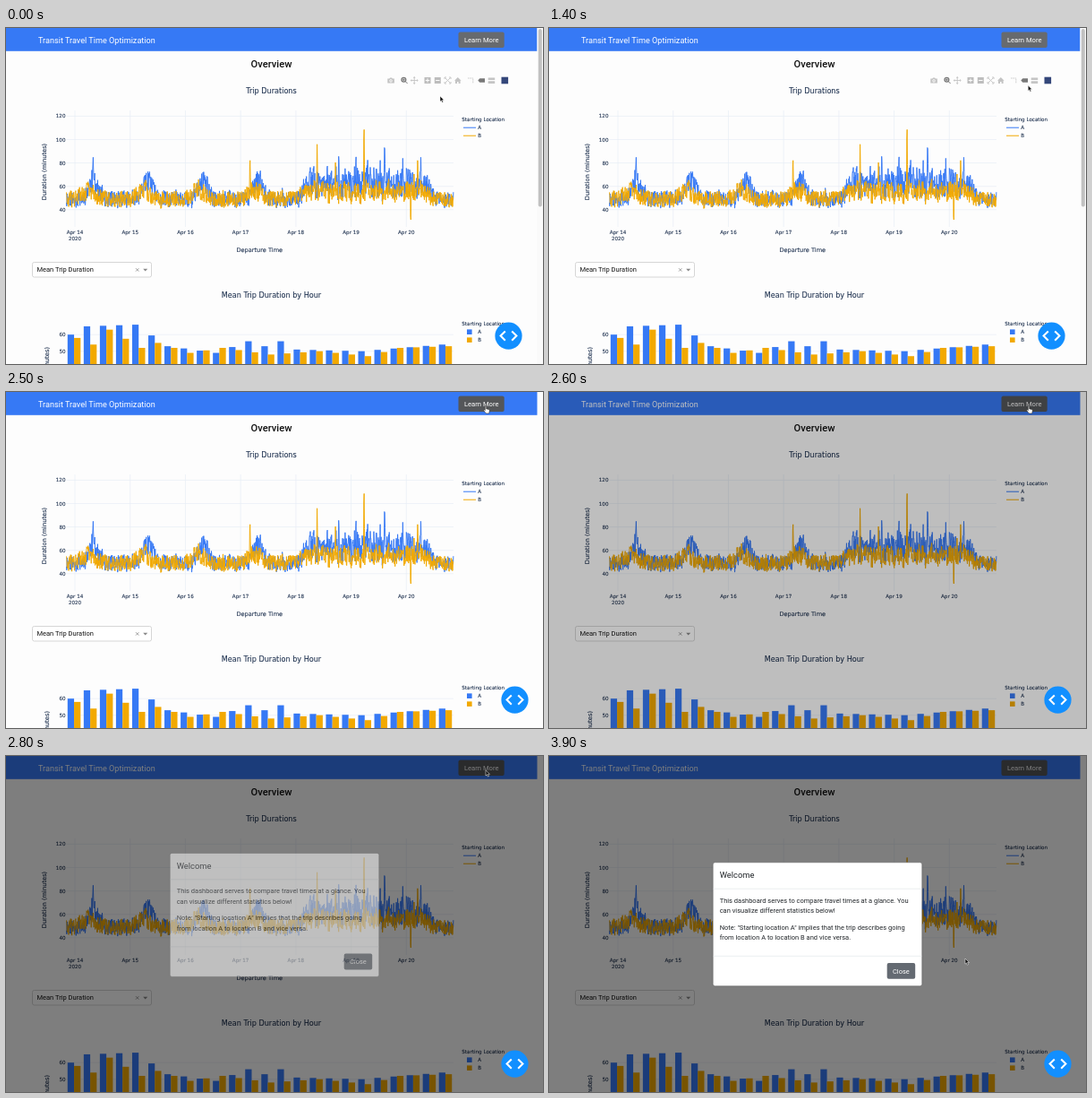
An HTML page that plays this animation: 600x375 px, repeating every 4000 ms.

```html
<!DOCTYPE html>
<html lang="en">
<head>
<meta charset="utf-8">
<title>Dashboard</title>
<style>
html, body { margin: 0; width: 100%; height: 100%; overflow: hidden; background: #fff; }
svg { display: block; width: 600px; height: 375px; }
.ui { font-family: Roboto, sans-serif; font-size: 7.5px; }
.plot { font-family: "DejaVu Sans", sans-serif; font-size: 5.6px; }
.plot text { fill: #1f3250; stroke: #1f3250; stroke-width: .1; }
.mid { text-anchor: middle; }
.end { text-anchor: end; }
</style>
</head>
<body>
<svg viewBox="0 0 600 375" xmlns="http://www.w3.org/2000/svg">
  <rect width="600" height="375" fill="#fdfdfd"/>
  <g class="ui">
    <rect width="593.5" height="25.8" fill="#3679f5"/>
    <text x="36" y="16.5" font-size="9.12" fill="#fff">Transit Travel Time Optimization</text>
    <rect id="learn" x="505.5" y="4.5" width="51.2" height="17.5" rx="2"/>
    <text class="mid" x="531.2" y="16" font-size="7.65" fill="#fff">Learn More</text>
    <text class="mid" x="296.5" y="44.3" font-size="11.2" font-weight="500" fill="#111">Overview</text>
    <rect x="29.5" y="261.5" width="133" height="16.5" rx="2" fill="#fff" stroke="#ccc" stroke-width=".8"/>
    <text x="34.5" y="272.3" fill="#111">Mean Trip Duration</text>
    <path d="M145 268.2l3.4 3.4m0-3.4l-3.4 3.4" stroke="#888" stroke-width=".8"/>
    <path d="M153.2 268.8h5l-2.5 2.6z" fill="#888"/>
  </g>
  <g class="plot">
    <g id="grid" stroke="#e9eef7" stroke-width=".7"></g>
    <g id="ticks"></g>
    <g id="lines" fill="none" stroke-width=".95" stroke-linejoin="round"></g>
    <g id="bars"></g>
    <g class="mid">
      <text x="296.5" y="73.3" font-size="8.1">Trip Durations</text>
      <text x="283.3" y="249.7" font-size="6.6">Departure Time</text>
      <text x="296.5" y="301" font-size="8.1">Mean Trip Duration by Hour</text>
      <text transform="translate(44.5 160.5) rotate(-90)" font-size="6.7">Duration (minutes)</text>
    </g>
    <text class="end" transform="translate(48.3 356) rotate(-90)" font-size="6.7">Mean Duration (minutes)</text>
    <g id="legends"></g>
  </g>
  <g id="modebar" fill="none" stroke="#c4c4c4" stroke-width="1.3">
    <path d="M426.3 56.5h2l.8-1h2l.8 1h2v5h-7.6z" fill="#c4c4c4" stroke="none"/>
    <circle cx="430" cy="58.9" r="1.3" stroke="#fff" stroke-width=".8"/>
    <g stroke="#787878"><circle cx="444.4" cy="57.8" r="2.4"/><path d="M446.2 59.6l2.4 2.4M443 57.8h2.8m-1.4-1.4v2.8" stroke-width="1"/></g>
    <path d="M452.5 58.5h7.4m-3.7-3.7v7.4" stroke-width=".9"/>
    <path d="M456.2 54l1.4 1.7h-2.8zM456.2 63l1.4-1.7h-2.8zM451.7 58.5l1.7-1.4v2.8zM460.7 58.5l-1.7-1.4v2.8z" fill="#c4c4c4" stroke="none"/>
    <path d="M467.5 55h7v7h-7zM478.8 55h7v7h-7z" fill="#bdbdbd" stroke="none"/>
    <path d="M468.8 58.5h4.4m-2.2-2.2v4.4M480.1 58.5h4.4" stroke="#fff" stroke-width="1"/>
    <path d="M490.5 55.5l6 6m0-6l-6 6M490 57v-2h2M495 55h2v2M497 60v2h-2M492 62h-2v-2" stroke-width=".9"/>
    <path d="M501 58.7l3.8-3.7 3.8 3.7h-1v3.3h-2v-2h-1.6v2h-2v-3.3z" fill="#c4c4c4" stroke="none"/>
    <path d="M516 56h5.8v6" stroke-width=".9" stroke-dasharray="1.5 .8"/>
    <path d="M527.3 58.5l2-2.3h5.7v4.6h-5.7z" fill="#787878" stroke="none"/>
    <path d="M538.7 55.4h7.5v2.7h-7.5zM538.7 59.3h7.5v2.7h-7.5z" fill="#c4c4c4" stroke="none"/>
    <rect x="553.5" y="54.7" width="7.6" height="7.6" fill="#34477a" stroke="none"/>
  </g>
  <g id="scroll"><rect x="593.5" width="6.5" height="375" fill="#fafafa"/><rect x="594.8" y="1" width="4" height="198.5" rx="2" fill="#c1c1c1"/></g>
  <rect id="shade" width="600" height="375"/>
  <g id="modal" class="ui" fill="#212529">
    <rect x="183.2" y="118.8" width="233.6" height="138" rx="2.2" fill="#fff" stroke="#555" stroke-width=".5"/>
    <path d="M183.5 148.2h233M183.5 223.3h233" stroke="#dee2e6" stroke-width=".6"/>
    <text x="190.7" y="136.3" font-size="9.36">Welcome</text>
    <text x="190.7" y="163.8">This dashboard serves to compare travel times at a glance. You</text>
    <text x="190.7" y="175">can visualize different statistics below!</text>
    <text x="190.7" y="193.8">Note: "Starting location A" implies that the trip describes going</text>
    <text x="190.7" y="205">from location A to location B and vice versa.</text>
    <rect x="377.7" y="231" width="31.5" height="17.8" rx="2" fill="#646a72"/>
    <text class="mid" x="393.4" y="242.6" fill="#fff">Close</text>
  </g>
  <g id="debug">
    <circle cy="343.6" r="15.1" fill="#128fff"/>
    <path d="M-3.7 338.4l-5.2 5.2 5.2 5.2M3.7 338.4l5.2 5.2-5.2 5.2" fill="none" stroke="#fff" stroke-width="2.1"/>
  </g>
  <g id="cursor" stroke="#fff" stroke-width=".5">
    <path id="arrow" d="M0 0v6.2l1.4-1.3 1 2.3 1.1-.5-1-2.2h2z" fill="#111"/>
    <path id="hand" d="M-.7 .2c0-.9 1.4-.9 1.4 0v2.8l2.9.7c.7.2.8.7.7 1.4l-.6 3h-3.4l-2.5-3.2c-.3-.7.5-1.3 1-.7l.5.5z" fill="#fff" stroke="#111"/>
  </g>
</svg>
<script>
const BLUE = '#3679f5', GOLD = '#f2a900', LOOP = 4000, STEP = 100, DAY = 61.72;
const $ = id => document.getElementById(id);
const clamp = v => Math.min(1, Math.max(0, v));
const ramp = (t, from, to) => clamp((t - from) / (to - from));
const smooth = p => p * p * (3 - 2 * p);
const linear = p => p;

function add(parent, tag, attrs, text) {
  const el = document.createElementNS('http://www.w3.org/2000/svg', tag);
  for (const k in attrs) el.setAttribute(k, attrs[k]);
  if (text !== undefined) el.textContent = text;
  return $(parent).appendChild(el);
}

function random(seed) {
  return () => {
    seed = (seed * 1664525 + 1013904223) >>> 0;
    return seed / 4294967296;
  };
}

// Value number n of the key list [[at, v1, v2...], ...]
function between(keys, at, n, ease) {
  let i = 0;
  while (i < keys.length - 2 && keys[i + 1][0] <= at) i++;
  const a = keys[i], b = keys[i + 1];
  return a[n] + (b[n] - a[n]) * ease(ramp(at, a[0], b[0]));
}

const valueY = v => 98.4 + (120 - v) * 1.305;
const barY = v => 342.2 + (60 - v) * 1.85;

function rowTick(v, y) {
  add('grid', 'path', { d: `M67.5 ${y}H500` });
  add('ticks', 'text', { x: 66.5, y: y + 2, class: 'end' }, v);
}
for (let v = 40; v <= 120; v += 20) rowTick(v, valueY(v));
for (const v of [50, 60]) rowTick(v, barY(v));
for (let i = 0; i < 7; i++) {
  const x = 77 + i * DAY;
  add('grid', 'path', { d: `M${x} 92V222` });
  add('ticks', 'text', { x, y: 229.6, class: 'mid' }, 'Apr ' + (14 + i));
}
add('ticks', 'text', { x: 77, y: 237, class: 'mid' }, '2020');

// Noise around a daily rush hour, livelier on the busy days, plus a few peaks
function series({ color, seed, rush, width, lift, busyLow, busyHigh, peaks }) {
  const rnd = random(seed);
  const pts = [];
  for (let x = 67.5; x <= 500; x += 0.36) {
    const busy = smooth(ramp(x, 324, 342)) * (1 - smooth(ramp(x, 452, 478)));
    const off = (x - rush + DAY / 2) % DAY - DAY / 2;
    const bump = Math.exp(-((off / width) ** 2)) * (1 - busy);
    const drift = (1.2 + 3 * busy) * Math.sin(x * 0.9) * Math.sin(x * 0.37);
    const low = 42 + lift * 0.75 * bump + busyLow * busy;
    const high = 56 + lift * bump + busyHigh * busy;
    const burst = rnd() < 0.06 ? rnd() * (4 + 14 * busy) : 0;
    let v = low + (high - low) * rnd() + drift + burst;
    const peak = peaks.find(p => Math.abs(p[0] - x) < 0.55);
    if (peak) v += (peak[1] - v) * (1 - Math.abs(peak[0] - x) / 0.8);
    pts.push(x.toFixed(2) + ' ' + valueY(v).toFixed(1));
  }
  add('lines', 'path', { d: 'M' + pts.join('L'), stroke: color });
}
series({
  color: BLUE, seed: 11, rush: 97, width: 7, lift: 18, busyLow: 8, busyHigh: 18,
  peaks: [[97.3, 86], [371.8, 91], [423, 99]]
});
series({
  color: GOLD, seed: 29, rush: 92, width: 9, lift: 9, busyLow: 5, busyHigh: 7,
  peaks: [[272.6, 86], [347.6, 97], [400, 119], [452.2, 27], [460, 86]]
});

// Hourly means
const meansA = [[0, 60], [1, 65], [4, 66], [6, 53], [9, 49], [11, 56], [12, 53], [13, 56], [14, 51], [18, 50], [23, 54]];
const meansB = [[0, 58], [1, 54], [2, 63], [4, 52], [5, 55], [7, 49], [9, 52], [12, 48], [15, 50], [18, 47], [20, 52], [23, 53]];
for (let i = 0; i < 24; i++) {
  [[meansA, BLUE], [meansB, GOLD]].forEach(([keys, fill], j) => {
    const y = barY(between(keys, i, 1, linear));
    add('bars', 'rect', { x: 68.8 + i * 18.04 + j * 7.25, y, width: 7.25, height: 375 - y, fill });
  });
}

for (const top of [104.2, 332.2]) {
  add('legends', 'text', { x: 509.3, y: top }, 'Starting Location');
  [['A', BLUE], ['B', GOLD]].forEach(([name, fill], i) => {
    const y = top + 7 + i * 9;
    const box = top < 200
      ? { x: 511, y: y - 0.5, width: 14, height: 1 }
      : { x: 515, y: y - 2.8, width: 5.6, height: 5.6 };
    add('legends', 'rect', { ...box, fill });
    add('legends', 'text', { x: 527.2, y: y + 2 }, name);
  });
}

// Cursor: time, x, y
const path = [
  [0, 485, 76], [200, 485, 76], [900, 534.5, 81.5], [1200, 535, 81],
  [1800, 536, 15.8], [3200, 536, 15.8], [3700, 482, 200], [3900, 465, 226]
];

function draw(t) {
  const x = between(path, t, 1, smooth), y = between(path, t, 2, smooth);
  const open = t >= 2500;
  const hover = y < 22;
  const pointing = hover && t < 2700;
  const set = (id, name, value) => $(id).setAttribute(name, value);
  const show = (id, on) => set(id, 'visibility', on ? 'visible' : 'hidden');
  set('cursor', 'transform', `translate(${x} ${y})`);
  show('hand', pointing);
  show('arrow', !pointing);
  show('scroll', !open);
  set('learn', 'fill', hover || open ? '#545659' : '#676a6e');
  set('modebar', 'opacity', 1 - ramp(t, 1500, 1800));
  set('debug', 'transform', `translate(${open ? 568.5 : 561.5} 0)`);
  set('shade', 'opacity', 0.5 * ramp(t, 2500, 2700));
  set('modal', 'opacity', ramp(t, 2700, 2900));
  set('modal', 'transform', `translate(0 ${-23.4 * (1 - ramp(t, 2700, 3000)) ** 2})`);
}

const start = performance.now();
function tick() {
  const t = (performance.now() - start) % LOOP;
  draw(Math.floor(t / STEP) * STEP);
  requestAnimationFrame(tick);
}
draw(0);
tick();
</script>
</body>
</html>
```
